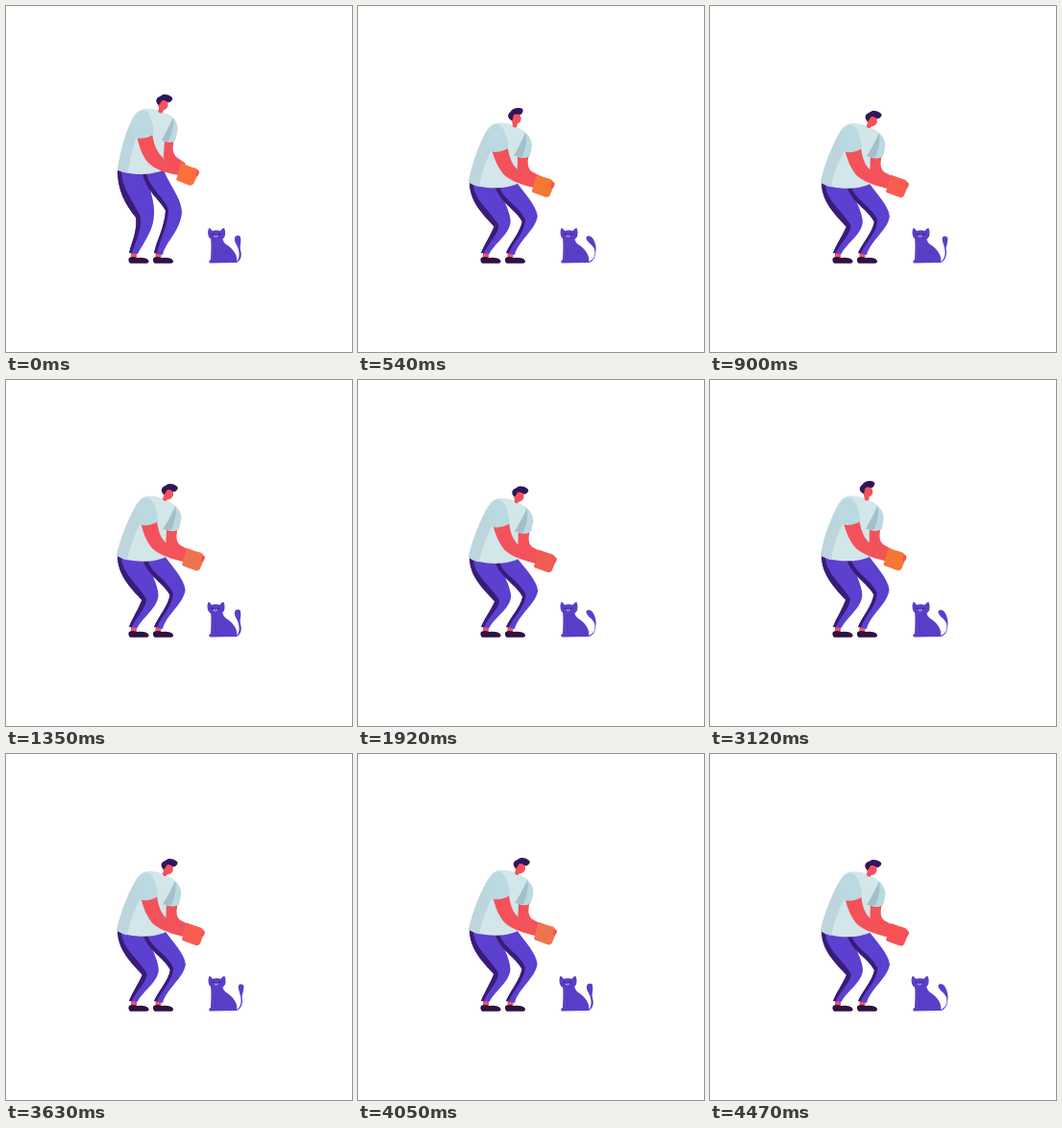
Write an HTML page with a canvas that moves like this. It is 360 px wide and 360 px high and loops after 4500 ms.

```html
<!DOCTYPE html>
<html>
<head>
<meta charset="utf-8">
<style>
html, body { margin: 0; width: 100%; height: 100%; overflow: hidden; background: #fff; }
canvas { display: block; width: 100vmin; height: 100vmin; }
</style>
</head>
<body>
<canvas id="stage"></canvas>
<script>
const canvas = document.getElementById('stage');
const ctx = canvas.getContext('2d');
const LOOP = 4500, STEP = 30, CROUCH_CYCLE = 2700, TAIL_CYCLE = 1350;
const C = {
  skin: '#f4525a', hair: '#30155c', shoe: '#2f1145',
  pants: '#5c40d0', pantsShade: '#3a1b78',
  shirt: '#d3e6ea', shirtShade: '#bdd6dd', sleeve: '#bbd9e0', fold: '#a2c0c9', cat: '#5a3ec8'
};

const mix = (a, b, k) => a + (b - a) * k;
const smooth = k => k * k * (3 - 2 * k);

// Rows are [time, ...values]; values ease from row to row.
function sample(rows, t) {
  let i = 0;
  while (i < rows.length - 2 && t >= rows[i + 1][0]) i++;
  const a = rows[i], b = rows[i + 1];
  const k = smooth(Math.min(1, Math.max(0, (t - a[0]) / (b[0] - a[0]))));
  return a.slice(1).map((v, j) => mix(v, b[j + 1], k));
}

// Blends two path strings that share the same commands.
function blend(a, b, k) {
  const end = b.match(/-?[\d.]+/g);
  let i = 0;
  return a.replace(/-?[\d.]+/g, n => mix(+n, +end[i++], k).toFixed(3));
}

function fill(path, color) {
  ctx.fillStyle = color;
  ctx.fill(new Path2D(path));
}

function line(path, color, width) {
  ctx.strokeStyle = color;
  ctx.lineWidth = width;
  ctx.lineCap = 'round';
  ctx.stroke(new Path2D(path));
}

// crouch, lean, head x, head y, head turn
const poseKeys = [
  [0, 0, 0, 163.5, 102, 0],
  [500, .94, -2, 164, 116.5, -.38],
  [560, .94, -2, 164.5, 116.5, -.36],
  [900, .97, 0, 168.8, 119, 0],
  [1350, .9, .5, 169, 118, 0],
  [1770, 1, 0, 168.5, 119.8, 0],
  [1930, 1.04, -.5, 167.5, 120.5, 0],
  [2400, 0, 0, 163.5, 102, 0],
  [2700, 0, 0, 163.5, 102, 0]
];

const boxKeys = [
  [0, 252, 112, 62], [540, 242, 120, 52], [930, 251, 92, 80],
  [1350, 238, 116, 80], [1770, 248, 82, 86], [1920, 240, 92, 82],
  [2550, 252, 114, 66], [2700, 252, 112, 62]
];

// Each part: color, standing outline, crouching outline.
const legs = [
  [C.pants,
    'M116 171 C116 192 124 206 135 220 C137 233 131 245 128 257 L137 258 C144 245 154 232 154 217 C155 205 150 194 147 176Z',
    'M116 184 C116 204 130 217 142 230 C137 241 131 249 128 257 L136.5 258 C143 246 159 237 159 224 C158 213 151 202 146 188Z'],
  [C.pantsShade,
    'M116 171 C116 192 124 206 135 220 C137 233 131 245 128 257 L131 257 C136 242 142 231 139.5 218 C131 201 121 190 120 173Z',
    'M116 184 C116 204 130 217 142 230 C137 241 131 249 128 257 L131 257 C136 246 148 236 146.5 228 C135 211 121 202 120 186Z'],
  [C.pants,
    'M143 172 L164 170 C170 187 183 200 183 215 C181 235 166 245 163 259 L154 257 C157 243 165 230 166 213 C163 203 149 191 143 172Z',
    'M142 187 L165 184 C173 195 186 208 187 219 C185 233 167 244 163 259 L154 257 C159 246 169 236 171 225 C166 212 150 204 142 187Z'],
  [C.pantsShade,
    'M142 174 C146 193 161 203 166 213 C165 230 157 243 154 257 L157 257 C160 243 169 229 169 211 C163 198 150 190 146 174Z',
    'M142 187 C147 205 164 212 171 225 C169 236 159 246 154 257 L157 257 C162 246 174 236 174.5 223 C167 207 151 203 147 188Z']
];

const backArm = [C.skin,
  'M162 138 L175 139 C173 147 173 152 177 157 L187 164 L181 171 C169 167 158 156 162 138Z',
  'M164 154 L179 156 C177 164 177 169 181 173 L192 179 L187 186 C173 182 160 171 164 154Z'];

const torso = [
  [C.shirt,
    'M116 170 C119 150 125 128 134 113 C139 105 155 106 165 111 C174 113 179 121 178 130 L176 140 C173 142 169 142 165 140 L163 171 C151 176 128 177 116 170Z',
    'M115 184 C119 165 128 143 137 129 C142 119 158 122 167 127 C177 131 183 138 182 147 L180 157 C177 159 172 160 167 157 L166 186 C153 192 128 192 115 184Z'],
  [C.shirtShade,
    'M116 170 C119 150 125 128 134 113 L136 134 C132 148 128 162 127 174 C122 173 119 172 116 170Z',
    'M115 184 C119 165 128 143 137 129 L140 150 C134 163 128 176 126 189 C121 188 118 186 115 184Z'],
  [C.sleeve,
    'M173 116 C179 121 179 127 178 132 L176 140 C173 142 168 142 163 140 C167 132 172 124 173 116Z',
    'M175 132 C183 139 183 145 182 149 L180 157 C177 159 171 160 165 157 C169 149 175 142 175 132Z'],
  [C.fold,
    'M174 117 C175 125 172 133 169 141 L162 140 C166 132 170 124 174 117Z',
    'M176 133 C178 142 175 150 172 158 L163 157 C168 149 172 141 176 133Z']
];

const frontArm = [
  [C.skin,
    'M136 134 L152 131 C154 151 162 158 170 162 C176 165 182 165 186 167 L180 176 C168 174 155 171 147 162 C141 154 138 145 136 134Z',
    'M140 149 L157 146 C159 166 166 172 174 175 C181 177 187 177 193 180 L187 191 C174 188 161 184 153 177 C146 169 143 160 140 149Z'],
  [C.sleeve,
    'M134 116 C139 106 147 106 150 115 C153 122 154 129 153 134 C148 137 141 139 133 137 C132 128 132 122 134 116Z',
    'M136 132 C142 121 150 122 154 131 C157 138 158 144 158 149 C152 152 146 154 138 152 C135 144 134 138 136 132Z']
];

const box = [
  'M182 163 Q190 167 198 169 Q201 171 200 175 L195 185 Q193 188 189 186 L179 182 Q176 181 178 178Z',
  'M188 176 Q196 179 203 181 Q207 184 206 188 L202 198 Q200 201 196 199 L185 195 Q182 194 184 191Z'
];

function drawShoe(x) {
  ctx.fillStyle = C.skin;
  ctx.fillRect(x + 2, 257, 6, 6);
  fill(`M${x} 262 Q${x + 4} 260 ${x + 8} 262 Q${x + 18} 261 ${x + 20.5} 265 Q${x + 21} 267.7 ${x + 18} 267.7 L${x + 1} 267.7 Q${x - 1.5} 265 ${x} 262Z`, C.shoe);
}

function drawHead(x, y, turn, crouch, lean) {
  const neckX = mix(161, 165.5, crouch) + lean, neckY = mix(109, 125, crouch);
  line(`M${x - 1.5} ${y + 3} L${neckX} ${neckY}`, C.skin, 5);
  ctx.save();
  ctx.translate(x, y);
  ctx.rotate(turn);
  fill('M-5 -4 C-3 -8 4 -7 5 -3 L5 2 C4 5 1 7 -2 6 C-5 5 -6 1 -5 -4Z', C.skin);
  fill('M-5 1 C-9 -3 -7 -7 -3 -8 C0 -11 5 -10 8 -8 C11 -6 10 -4 7 -2 C4 -1 3 -4 0 -4 C-3 -4 -2 0 -5 1Z', C.hair);
  ctx.restore();
}

function drawMan(t) {
  const [crouch, lean, headX, headY, turn] = sample(poseKeys, t);
  const part = ([color, a, b]) => fill(blend(a, b, crouch), color);
  drawShoe(128);
  drawShoe(153.5);
  legs.forEach(part);

  // The upper body shears around the hem.
  const hem = mix(172, 187, crouch), shear = -lean / 65;
  ctx.save();
  ctx.transform(1, 0, shear, 1, -shear * hem, 0);
  part(backArm);
  torso.forEach(part);
  ctx.restore();

  drawHead(headX, headY, turn, crouch, lean);

  ctx.save();
  ctx.transform(1, 0, shear, 1, -shear * hem, 0);
  frontArm.forEach(part);
  ctx.restore();

  ctx.save();
  ctx.translate(lean, 0);
  fill(blend(box[0], box[1], crouch), `rgb(${sample(boxKeys, t).map(Math.round)})`);
  ctx.fillStyle = C.skin;
  ctx.beginPath();
  ctx.ellipse(mix(199, 205, crouch), mix(174, 187, crouch), 1.8, 3.2, .3, 0, 7);
  ctx.fill();
  ctx.restore();
}

const tails = [
  'M240 266 C243 263 243 258 242 254 C241 249 237 246 238 241 C239 238 244 238 244 241 C245 246 243 249 244 254 C246 260 244 265 240 267Z',
  'M240 266 C246 264 247.5 258 246 253 C244 248 237 245 237.5 241 C238 238 243 239 244.5 242 C247 246 248 251 247.5 255 C247 261 245 266 240 267Z',
  'M240 266 C245 263 245 257 244 252 C243 247 241 243 242 241 C243 239 247 239 247.5 242 C247 247 246 250 245.5 252 C247 259 245 265 240 267Z'
];
const tailKeys = [[0, 0], [460, 1], [600, 1], [930, 2], [1200, 3], [1350, 3]];
const nodKeys = [[0, 0], [540, .5], [930, .4], [1350, -.6], [1770, -.5], [1920, .4], [2550, -.2], [2700, 0]];

function drawCat(t) {
  const swing = sample(tailKeys, t % TAIL_CYCLE)[0];
  const i = Math.min(2, Math.floor(swing));
  fill(blend(tails[i], tails[(i + 1) % 3], swing - i), C.cat);
  fill('M213 241 C214 250 213 258 213 264 Q210 265 212 267.5 L240 267 C242 260 236 252 229 248 Q226 246 225 241Z', C.cat);
  line('M218 254 L218 264 M224 262 Q225 257 230 256', '#4a2fb4', .6);

  ctx.save();
  ctx.translate(sample(nodKeys, t)[0], 0);
  fill('M211 231 Q213 231 214.5 234 Q219 232.5 223 234 Q225 231 227 231 Q229 235 227.5 240 Q225 244.5 219 244 Q212 244 210.5 239 Q209.5 234 211 231Z', C.cat);
  line('M214.5 237.5 L216 237.5 M221 237.5 L222.5 237.5', '#30186c', .9);
  line('M216.5 239.5 Q218 241 220 239.5', '#efb4d0', 1);
  ctx.restore();
}

function resize() {
  const size = Math.round(Math.min(innerWidth, innerHeight) * devicePixelRatio);
  if (canvas.width !== size) canvas.width = canvas.height = size;
}

function draw() {
  resize();
  const scale = canvas.width / 360;
  const time = Math.floor(performance.now() % LOOP / STEP) * STEP;
  ctx.setTransform(scale, 0, 0, scale, 0, 0);
  ctx.fillStyle = '#fff';
  ctx.fillRect(0, 0, 360, 360);
  drawMan(time % CROUCH_CYCLE);
  drawCat(time % CROUCH_CYCLE);
  requestAnimationFrame(draw);
}
draw();
</script>
</body>
</html>
```
